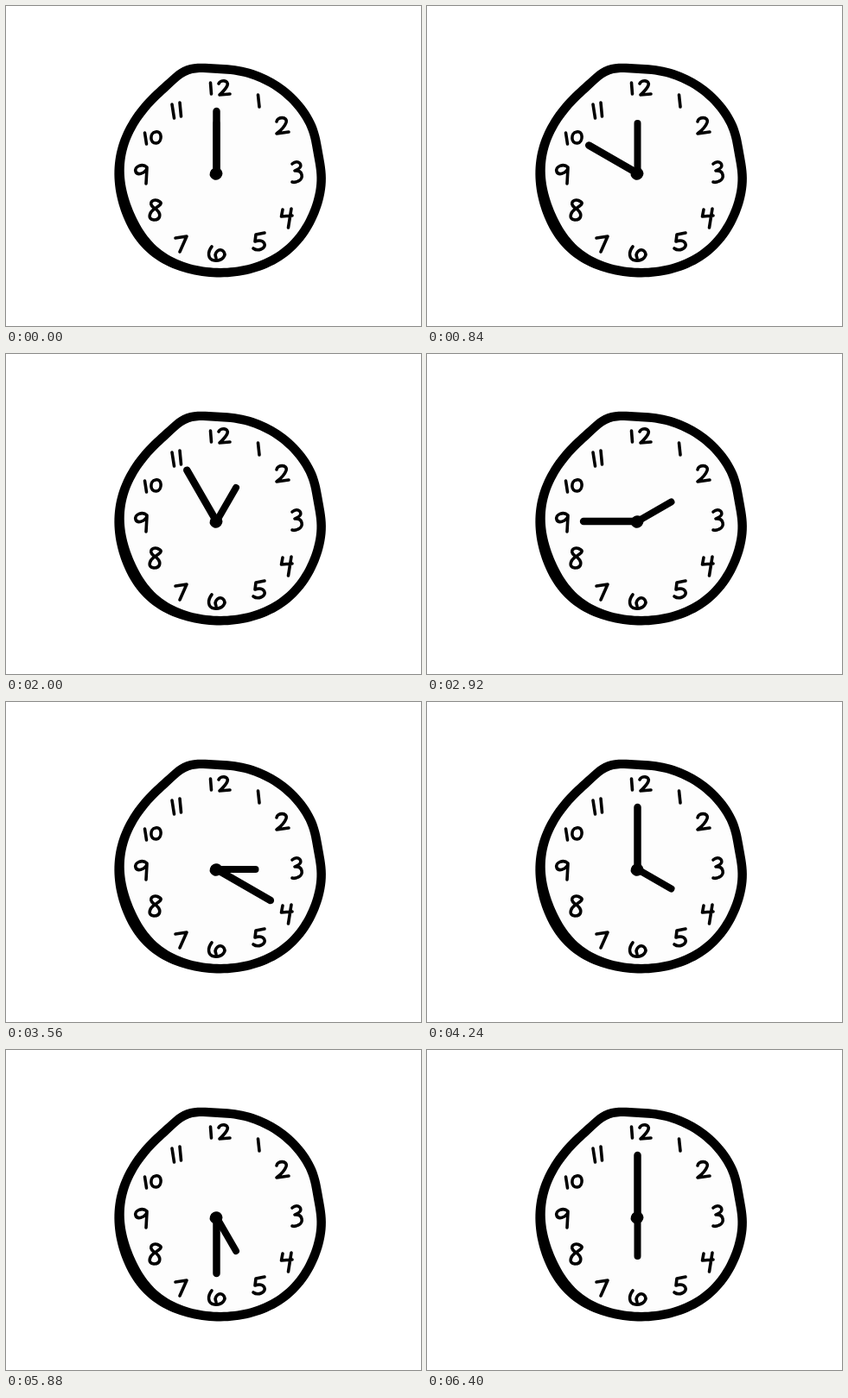
Write an HTML page with a canvas that moves like this. It is 480x371 px and loops after 6440 ms.

```html
<!DOCTYPE html>
<html lang="en">
<head>
<meta charset="utf-8">
<title>Hand-drawn clock</title>
<style>
  html, body { margin: 0; width: 100%; height: 100%; overflow: hidden; background: #fff; }
  canvas { display: block; width: 480px; height: 371px; }
</style>
</head>
<body>
<canvas id="stage" width="480" height="371"></canvas>
<script>
const ctx = document.getElementById('stage').getContext('2d');
const LOOP = 6440;
const TAU = 2 * Math.PI;
const INK = '#000';
const DIAL = { x: 248, y: 191, radius: 123 };
const PIVOT = { x: 243.5, y: 194 };

// Pen strokes of the numerals, 12 first, then clockwise.
const numerals = new Path2D([
  'M236.5 89 L237.5 102 M246 90 C248 85 258 86 256 92 C254 97 250 100 247 103 L259 102',
  'M291.5 103 L293 117',
  'M313 134 C314 128 326 128 324 135 C322 141 317 145 313 148 L327 146',
  'M331 183 C338 177 345 185 338 189 L334 191 C343 190 345 200 338 203 Q334 205 331 204',
  'M320 236 L318.5 244 L331 243 M330 235 L326.5 257',
  'M299 263 L289 265 L288 273 C299 269 303 279 295 282 Q290 284 286 281',
  'M238 279 C233 285 233 294 241 295 C250 296 256 289 251 284 C247 280 240 286 243 292',
  'M196 269 L209 267 L201 285',
  'M178 227 C171 222 163 228 171 234 C181 240 179 248 171 248 C163 247 166 239 172 235 C178 231 181 229 178 227',
  'M163 187 C158 182 148 186 150 192 C152 197 161 194 163 188 L162 206',
  'M160.5 147 L162.5 160 M173 146 C181 144 181 158 174 159 C166 160 166 147 173 146',
  'M192 114 L194.5 130 M201 112 L202.5 128'
].join(' '));

// A smooth swell around one direction, in degrees clockwise from the right.
function swell(angle, centre, spread) {
  const away = (angle - centre + 540) % 360 - 180;
  return Math.exp(-((away / spread) ** 2) / 2);
}

const rimRadius = a => DIAL.radius
  + 6 * swell(a, 252, 8)
  - 3.5 * swell(a, 220, 20)
  + 4 * swell(a, 131, 17)
  + 2.5 * swell(a, 50, 18)
  - 3 * swell(a, 350, 9);

const faceRadius = a => rimRadius(a) - 10.5 - 3 * swell(a, 148, 20);

function outline(radiusAt) {
  const path = new Path2D();
  for (let a = 0; a < 360; a += 2) {
    const r = radiusAt(a);
    const turn = a * TAU / 360;
    path.lineTo(DIAL.x + r * Math.cos(turn), DIAL.y + r * Math.sin(turn));
  }
  path.closePath();
  return path;
}

const rim = outline(rimRadius);
const face = outline(faceRadius);

// Five clock minutes pass about every 90 ms on a 40 ms beat, never faster than 80 ms.
function stepAt(time) {
  const beat = 40 * Math.floor(time / 40);
  return Math.min(Math.floor(beat / 80), Math.floor((beat + 79.57) / 89.99));
}

function drawHand(turn, length, width) {
  ctx.lineWidth = width;
  ctx.beginPath();
  ctx.moveTo(PIVOT.x, PIVOT.y);
  ctx.lineTo(PIVOT.x + length * Math.sin(turn), PIVOT.y - length * Math.cos(turn));
  ctx.stroke();
}

function draw(step) {
  const hour = Math.floor(step / 12);
  const minuteTurn = (step % 12) * TAU / 12;
  // The pivot sits left of the middle, so the minute hand reaches further right.
  const minuteLength = 68.5 + 7 * Math.cos(minuteTurn - TAU / 6);
  const hourLength = hour ? 45 : 58;

  ctx.filter = 'none';
  ctx.fillStyle = '#fff';
  ctx.fillRect(0, 0, 480, 371);
  ctx.fillStyle = INK;
  ctx.fill(rim);
  ctx.fillStyle = '#fdfdfd';
  ctx.fill(face);

  ctx.filter = 'blur(0.5px)';
  ctx.strokeStyle = ctx.fillStyle = INK;
  ctx.lineCap = ctx.lineJoin = 'round';
  ctx.lineWidth = 3.6;
  ctx.stroke(numerals);

  drawHand(hour * TAU / 12, hourLength, 8);
  drawHand(minuteTurn, minuteLength, 8.5);
  ctx.beginPath();
  ctx.ellipse(PIVOT.x - 0.5, PIVOT.y + 0.5, 7.5, 7, -0.5, 0, TAU);
  ctx.fill();
}

const begin = performance.now();
function tick() {
  draw(stepAt((performance.now() - begin) % LOOP));
  requestAnimationFrame(tick);
}
draw(0);
requestAnimationFrame(tick);
</script>
</body>
</html>
```
